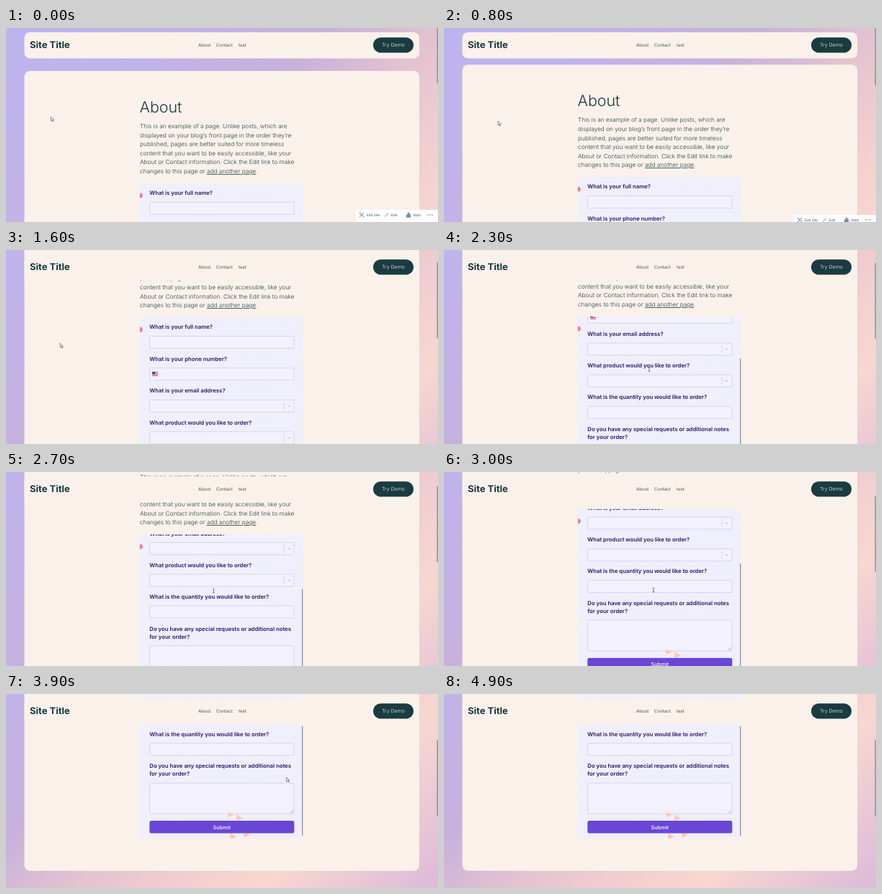
An HTML page that plays this animation: 600x271 px, repeating every 5700 ms.

```html
<!DOCTYPE html>
<html lang="en">
<head>
<meta charset="utf-8">
<title>Form page</title>
<style>
  html, body { margin: 0; width: 100%; height: 100%; overflow: hidden; background: #c2b4e6; }
  svg { display: block; }
  #stage { width: 100vw; height: 100vh; }
  text { font-family: Inter, "Open Sans", sans-serif; text-rendering: geometricPrecision; white-space: pre; }
  .title { font-size: 21.4px; font-weight: 300; fill: #173a40; }
  .body { font-size: 8.3px; font-weight: 300; fill: #24444b; }
  .brand { font-size: 13px; font-weight: 700; fill: #173a40; }
  .nav { font-size: 6.15px; fill: #3f5a5f; }
  .demo { font-size: 7px; font-weight: 300; fill: #fbf3ec; text-anchor: middle; }
  .label { font-size: 7.75px; font-weight: 600; fill: #2b1568; }
  .submit { font-size: 7.3px; font-weight: 500; fill: #fff; text-anchor: middle; }
  .bar { font-size: 4.7px; fill: #3c5468; }
  .field { fill: #f5f3fd; fill-opacity: .6; stroke: #d3cce6; stroke-width: .8; }
  .icon { fill: none; stroke: #4f7390; stroke-width: .9; }
  .mark { fill: none; stroke: #a9a5bb; stroke-width: .8; }
</style>
</head>
<body>
<svg id="stage" viewBox="0 0 600 271" preserveAspectRatio="none">
  <defs>
    <linearGradient id="sky" gradientUnits="userSpaceOnUse" x1="0" y1="0" x2="560" y2="560">
      <stop offset="0" stop-color="#bdb4ef"/>
      <stop offset=".22" stop-color="#c1b3e8"/>
      <stop offset=".4" stop-color="#c7b1dc"/>
      <stop offset=".54" stop-color="#e3c2d0"/>
      <stop offset=".68" stop-color="#f1cfd0"/>
      <stop offset=".78" stop-color="#f7d7d0"/>
      <stop offset="1" stop-color="#dcb9da"/>
    </linearGradient>
    <pattern id="dots" width="6" height="6" patternUnits="userSpaceOnUse">
      <circle cx="2" cy="2" r=".5" fill="#e2e0f5"/>
    </pattern>
  </defs>

  <g id="page">
    <rect width="600" height="620" fill="url(#sky)"/>
    <rect x="25.5" y="60" width="548.5" height="435" rx="8" fill="#faf1ea"/>
    <text class="title" x="185.5" y="118">About</text>
    <g id="copy"></g>
    <svg x="186" y="217" width="226.5" height="233" viewBox="186 217 226.5 233" overflow="hidden">
      <rect x="186" y="217" width="226.5" height="233" fill="#f0effc"/>
      <rect x="186" y="217" width="226.5" height="233" fill="url(#dots)"/>
      <circle cx="186.3" cy="234" r="3.5" fill="#ee7b96"/>
      <g id="shards" fill="#f8cdae"></g>
      <g id="form"></g>
      <rect id="thumb" x="411" width="1.5" height="153" rx=".7" fill="#8f8c9b"/>
    </svg>
  </g>

  <rect x="25.5" y="6" width="548.5" height="36.5" rx="8" fill="#faf1ea"/>
  <text class="brand" x="33" y="28.3">Site Title</text>
  <text class="nav" x="267" y="26">About</text>
  <text class="nav" x="292" y="26">Contact</text>
  <text class="nav" x="323" y="26">test</text>
  <rect x="510" y="13.2" width="56" height="21.4" rx="10.7" fill="#1a3b40"/>
  <text class="demo" x="538" y="26.4">Try Demo</text>

  <g id="bar">
    <rect x="486" y="254" width="114" height="18" fill="#fff"/>
    <path class="icon" d="M491 258l6 6M497 258l-6 6M490.5 259.5l2-2M495.5 264.5l2-2"/>
    <text class="bar" x="501" y="262.7">Edit Site</text>
    <path class="icon" stroke-width="1.6" d="M526.4 263.4l4.6-4.6"/>
    <text class="bar" x="535" y="262.7">Edit</text>
    <path class="icon" d="M556.5 264v-3h1.4v3M558.2 264v-6h1.4v6M560 264v-4h1.4v4M556 264.2h6"/>
    <text class="bar" x="565" y="262.7">Stats</text>
    <g fill="#5b7183">
      <circle cx="586" cy="261" r=".8"/><circle cx="589" cy="261" r=".8"/><circle cx="592" cy="261" r=".8"/>
    </g>
  </g>

  <rect id="pageThumb" x="598.4" width="1.6" height="106" fill="#9a909c"/>

  <path id="arrow" d="M0 0v5.8l1.4-1.2 1 2.1 .9-.4-1-2.1h1.8z" fill="#fff" stroke="#3a3a3a" stroke-width=".6"/>
  <path id="beam" d="M-1.2-2.7h2.4M0-2.7v5.4M-1.2 2.7h2.4" fill="none" stroke="#444" stroke-width=".7"/>
</svg>

<script>
const LOOP = 5700, STEP = 100, NOTCH = 124 / 3, FORM_MAX = 104;
const $ = id => document.getElementById(id);

const lines = [
  "This is an example of a page. Unlike posts, which are",
  "displayed on your blog’s front page in the order they’re",
  "published, pages are better suited for more timeless",
  "content that you want to be easily accessible, like your",
  "About or Contact information. Click the Edit link to make",
  'changes to this page or <tspan text-decoration="underline">add another page</tspan>.'
];
$("copy").innerHTML = lines.map((s, i) =>
  `<text class="body" x="186" y="${140.2 + i * 12.55}">${s}</text>`).join("");

const label = (y, s) => `<text class="label" x="199.3" y="${y + 2.8}">${s}</text>`;
const field = (y, h = 17) => `<rect class="field" x="199.5" y="${y}" width="200.5" height="${h}" rx="1"/>`;
const select = y => field(y) +
  `<path class="mark" d="M386 ${y + 3}v11" stroke-opacity=".5"/>` +
  `<path class="mark" d="M391 ${y + 7.5}l2 2 2-2"/>`;

function flag(x, y) {
  let s = `<rect x="${x}" y="${y}" width="8" height="6" fill="#f6e9ec"/>`;
  for (let i = 0; i < 4; i++)
    s += `<rect x="${x}" y="${y + i * 1.7}" width="8" height=".9" fill="#d9485c"/>`;
  return s + `<rect x="${x}" y="${y}" width="4" height="3.4" fill="#3d4a8f"/>`;
}

$("form").innerHTML =
  label(230.3, "What is your full name?") + field(243.3) +
  label(275, "What is your phone number?") + field(287.7) +
  flag(203, 293) + `<path d="M213 295.6h2l-1 1.2z" fill="#aaa6b8"/>` +
  label(319.5, "What is your email address?") + select(332.3) +
  label(364, "What product would you like to order?") + select(376.7) +
  label(408, "What is the quantity you would like to order?") + field(420.7) +
  label(452.5, "Do you have any special requests or additional notes") +
  label(463.5, "for your order?") + field(476.3, 43) +
  `<path class="mark" stroke="#666" d="M394.5 518.5l4.5-4.5M397 518.5l2-2"/>` +
  `<rect x="199.3" y="529" width="201" height="17.6" rx="2.5" fill="#6a46d6"/>` +
  `<text class="submit" x="299.8" y="540.5">Submit</text>`;

$("shards").innerHTML = [[308, 411], [320, 416.5], [311, 442], [330, 439]]
  .map(([x, y]) => `<path d="M${x} ${y}l9 5.2-8.6 4.4z"/>`).join("");

// wheel notches: start, duration
const pageWheel = [[720, 270], [1000, 300], [1330, 300], [2620, 340], [3010, 340], [3390, 200]];
const formWheel = [[1850, 300], [2060, 300], [2310, 200]];
// time, x, y
const mouse = [
  [0, 62.5, 124], [400, 75, 130], [1600, 75.3, 130.3], [1800, 206, 152], [2300, 285, 167],
  [3000, 291, 165], [3400, 303, 163], [3700, 316, 154], [4200, 500, 60], [4800, 546, 17]
];

const smooth = k => { k = Math.min(1, Math.max(0, k)); return k * k * (3 - 2 * k); };
const scroll = (wheel, t) => wheel.reduce((sum, [at, d]) => sum + NOTCH * smooth((t - at) / d), 0);

function track(keys, t) {
  const i = keys.findIndex(k => k[0] > t);
  if (i < 0) return keys[keys.length - 1].slice(1);
  const a = keys[i - 1], b = keys[i], k = (t - a[0]) / (b[0] - a[0]);
  return [a[1] + (b[1] - a[1]) * k, a[2] + (b[2] - a[2]) * k];
}

const move = (id, x, y) => $(id).setAttribute("transform", `translate(${x} ${y})`);
const show = (id, on) => $(id).setAttribute("visibility", on ? "visible" : "hidden");

function draw(t) {
  const top = scroll(pageWheel, t), inner = Math.min(FORM_MAX, scroll(formWheel, t));
  move("page", 0, -top);
  move("form", 0, -inner);
  $("thumb").setAttribute("y", 221 + 72 * inner / FORM_MAX);
  show("thumb", t >= 1900);
  $("pageThumb").setAttribute("y", -29 + .377 * top);

  const slide = Math.max(0, (t - 730) * .1);
  move("bar", 0, slide);
  show("bar", slide < 18);

  const [x, y] = track(mouse, t), beam = t >= 1900 && t < 3700;
  move("arrow", x, y);
  move("beam", x, y);
  show("beam", beam);
  show("arrow", !beam && t < 4900);
}

const start = performance.now();
function tick() {
  const t = (performance.now() - start) % LOOP;
  draw(Math.floor(t / STEP) * STEP);
  requestAnimationFrame(tick);
}
tick();
</script>
</body>
</html>
```
